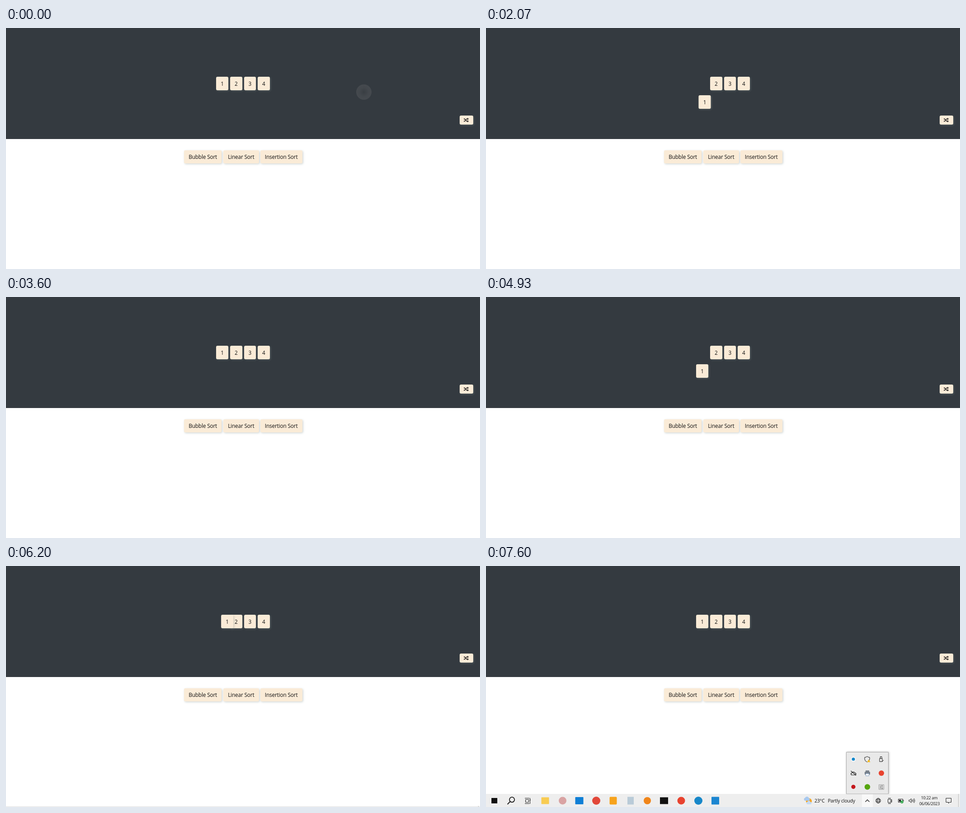
These frames come from a looping animation (1049 px wide and 534 px high, 8940 ms). An HTML page:

```html
<!DOCTYPE html>
<html lang="en">
<head>
<meta charset="utf-8">
<title>Sorting visualiser</title>
<style>
  :root { --loop: 8940ms; --cream: #faebd7; }
  html, body { margin: 0; width: 100%; height: 100%; overflow: hidden; background: #fff; }
  body { position: relative; font: 11.8px "Open Sans", "Noto Sans", sans-serif; letter-spacing: -.15px; color: #111; }
  header { position: absolute; inset: 0 0 auto; height: 246px; background: #343a40; }
  .btn {
    position: absolute; display: flex; align-items: center; justify-content: center;
    background: var(--cream); border-radius: 3px; white-space: nowrap;
    box-shadow: 1.5px 1.5px 4px rgba(130, 145, 142, .38);
  }
  .tile { top: 108px; width: 26.7px; height: 29.5px; }
  .algo { top: 270.6px; height: 29.2px; }
  .shuffle { left: 1003.6px; top: 193.6px; width: 30px; height: 20.7px; }
  .mover { z-index: 1; animation: hop var(--loop) ease infinite; }

  /* Down, right, up, then back along the row; twice per loop. */
  @keyframes hop {
    0%, 16.499%, 39.765%, 49.754%, 73.02%, 100% { transform: none; }
    22.315%, 55.57% { transform: translate(0, 41px); }
    28.132%, 61.387% { transform: translate(30.7px, 41px); }
    33.949%, 67.204% { transform: translate(30.7px, 0); }
  }

  .tap {
    position: absolute; z-index: 2; width: 34px; height: 34px; margin: -17px; border-radius: 50%; opacity: 0;
    background: radial-gradient(circle closest-side, rgba(120, 112, 105, .08), rgba(128, 128, 128, .2) 60%, rgba(132, 132, 132, .22));
  }
  .first { animation: first var(--loop) step-end infinite; }
  .second { animation: second var(--loop) linear infinite; }
  .third { animation: third var(--loop) linear infinite; }
  @keyframes first { 0% { opacity: 1; } .77%, 100% { opacity: 0; } }
  @keyframes second {
    0%, 17.1% { opacity: 0; transform: scale(.7); }
    17.11% { opacity: 1; transform: scale(.7); }
    18.6% { opacity: 1; transform: none; }
    19.35%, 100% { opacity: 0; transform: none; }
  }
  @keyframes third {
    0%, 49.2% { opacity: 0; transform: scale(.7); }
    49.21% { opacity: 1; transform: scale(.7); }
    50.7% { opacity: 1; transform: none; }
    51.45%, 100% { opacity: 0; transform: none; }
  }

  #desk { position: absolute; left: 0; top: 0; }
  #desk text { fill: #111; font-size: 10.5px; letter-spacing: -.2px; }
  #desk .clock { font-size: 8.8px; letter-spacing: -.15px; text-anchor: middle; }
  .line { fill: none; stroke: #1a1a1a; stroke-width: 1; }
  .bar { animation: rise var(--loop) ease-out infinite; }
  .pop { animation: pop var(--loop) step-end infinite; }
  @keyframes rise { 0%, 69.13% { transform: translateY(30px); } 72.48%, 100% { transform: none; } }
  @keyframes pop { 0% { opacity: 0; } 85%, 100% { opacity: 1; } }
</style>
</head>
<body>
<header></header>

<div class="btn tile mover" style="left:465.2px">1</div>
<div class="btn tile" style="left:495.9px">2</div>
<div class="btn tile" style="left:526.5px">3</div>
<div class="btn tile" style="left:557px">4</div>

<div class="btn shuffle">
  <svg width="11" height="10" viewBox="0 0 11 10">
    <g fill="none" stroke="#111" stroke-width="1.5">
      <path d="M0 2.4H2.1L6.4 7.6H8.6M0 7.6H2.1L3.5 5.9M5 4.1L6.4 2.4H8.6"/>
    </g>
    <path d="M8.2 0L11 2.4 8.2 4.8zM8.2 5.2L11 7.6 8.2 10z" fill="#111"/>
  </svg>
</div>

<div class="btn algo" style="left:394px;width:83.3px">Bubble Sort</div>
<div class="btn algo" style="left:481px;width:78.6px">Linear Sort</div>
<div class="btn algo" style="left:562.6px;width:93px">Insertion Sort</div>

<i class="tap first" style="left:791.5px;top:142px"></i>
<i class="tap second" style="left:1023px;top:212px"></i>
<i class="tap third" style="left:1030px;top:216px"></i>

<svg id="desk" width="1049" height="534" viewBox="0 0 1049 534">
  <g class="bar">
    <path d="M0 505H1049V534H0z" fill="#eee"/>
    <path class="pop" d="M832 505H856V534H832z" fill="#f8f8f8"/>
    <path d="M1045.5 505V534" stroke="#bbb"/>

    <!-- launchers -->
    <path d="M12 514H25V526H12z" fill="#111"/>
    <g class="line" stroke-width="1.8" style="stroke-width:1.8">
      <circle cx="57.5" cy="517.8" r="5.6"/>
      <path d="M53.3 522L47.5 528"/>
    </g>
    <path class="line" d="M87.5 517.5H94.5V523.5H87.5zM86 514.5H96M86 526.5H96M97.5 514V527M96.5 518.5H99"/>
    <g id="apps"></g>

    <!-- weather -->
    <circle cx="714.5" cy="521" r="6.5" fill="#f5a623"/>
    <path d="M706 520a3.2 3.2 0 0 1 0-6.2a4.6 4.6 0 0 1 8.6.6a2.9 2.9 0 0 1 0 5.6z" fill="#a9c9ee"/>
    <path d="M711 528a2.8 2.8 0 0 1 .3-5.4a3.6 3.6 0 0 1 6.8.4a2.5 2.5 0 0 1 0 5z" fill="#c3daf5"/>
    <text x="727" y="524">23°C</text>
    <text x="756.5" y="524">Partly cloudy</text>

    <!-- tray -->
    <path class="line" d="M839.5 522.5L844 518L848.5 522.5" style="stroke-width:1.3"/>
    <g class="line">
      <circle cx="868" cy="520" r="5.3"/>
      <ellipse cx="868" cy="520" rx="2.5" ry="5.3"/>
      <path d="M863 518H873M863 522H873"/>
      <path d="M889.5 517H896V524H889.5zM896 519L898 517.5V523.5L896 522M890 514.5H896M890 526.5H896"/>
      <path d="M912.5 516.5H922.5V523.5H912.5zM924 518.5V521.5"/>
      <path d="M936 518.5H938L941 515.5V524.5L938 521.5H936z"/>
      <path d="M943 518q1.5 2 0 4M945 516.5q2.7 3.5 0 7M947 515q3.8 5 0 10"/>
      <path d="M1018 514.5H1029.5V523.5H1025.5L1023.5 526V523.5H1018z"/>
    </g>
    <path d="M914 518H918V522H914z" fill="#111"/>
    <circle cx="920.5" cy="522.8" r="3.2" fill="#27a243"/>
    <path d="M919 522.8L920.2 524L922.2 521.6" fill="none" stroke="#fff" stroke-width=".8"/>
    <text class="clock" x="981" y="516.5">10:22 am</text>
    <text class="clock" x="981.5" y="530">06/06/2023</text>
  </g>

  <g class="pop">
    <path d="M797.5 505V412.5H890.5V505z" fill="#e9e9e9" stroke="#a8a8a8"
      style="filter:drop-shadow(1px 0 2px rgba(0,0,0,.25));clip-path:inset(-5px -6px 0)"/>
    <circle cx="813" cy="428" r="5.2" fill="#fff"/>
    <circle cx="813" cy="428" r="3.6" fill="#1787c9"/>
    <g class="line">
      <path d="M843.5 422q2.5 2 5.5 2v4q0 4-5.5 6.5q-5.5-2.5-5.5-6.5v-4q3 0 5.5-2z"/>
      <path d="M871 426.5H877V433.5H871zM872.5 426.5V422.5H876V426.5M877 433L880 430"/>
      <path d="M810 463a2.3 2.3 0 0 1 0-4.6a3.6 3.6 0 0 1 6.6.2a2.2 2.2 0 0 1 0 4.4zM807.5 454L819 464" style="stroke-width:1.2"/>
    </g>
    <path d="M847 428.5L850.5 434.5H843.5z" fill="#f6b91a"/>
    <path d="M840 453H848V456H840zM838 456H850V462H838z" fill="#78818c"/>
    <path d="M840.5 460H847.5V465H840.5z" fill="#fff" stroke="#6b8fb8" stroke-width=".8"/>
    <circle cx="875" cy="459" r="6" fill="#e8432f"/>
    <circle cx="813" cy="489.3" r="4.6" fill="#c4171c"/>
    <circle cx="844" cy="489.5" r="6.2" fill="#55a50c"/>
    <path d="M869.5 484.5H880.5V495H869.5z" fill="#f3f3f3" stroke="#999"/>
    <path d="M871 487H879M871 490H879M871 493H879M876.5 485.8V488.2M873 488.8V491.2M877 491.8V494.2" stroke="#555" stroke-width=".9"/>
  </g>
</svg>

<script>
  // Launcher icons: centre x, width, height, corner radius, colour.
  const apps = [
    [131, 17, 15, 1, "#f8cc52"],
    [169.5, 17, 17, 9, "#d9a3a3"],
    [206.5, 18, 16, 1, "#0f7fd6"],
    [244, 18, 18, 9, "#e2483a"],
    [281.5, 16, 17, 2, "#f7a31c"],
    [320, 14, 17, 0, "#b9cbd8"],
    [357, 16, 16, 8, "#f0851a"],
    [394, 18, 15, 0, "#111"],
    [432, 17, 17, 9, "#e8432f"],
    [470, 18, 18, 9, "#1787c9"],
    [507.5, 17, 17, 1, "#1c86d1"],
  ];
  document.getElementById("apps").innerHTML = apps.map(([x, w, h, r, fill]) =>
    `<rect x="${x - w / 2}" y="${520 - h / 2}" width="${w}" height="${h}" rx="${r}" fill="${fill}"/>`).join("");
</script>
</body>
</html>
```
